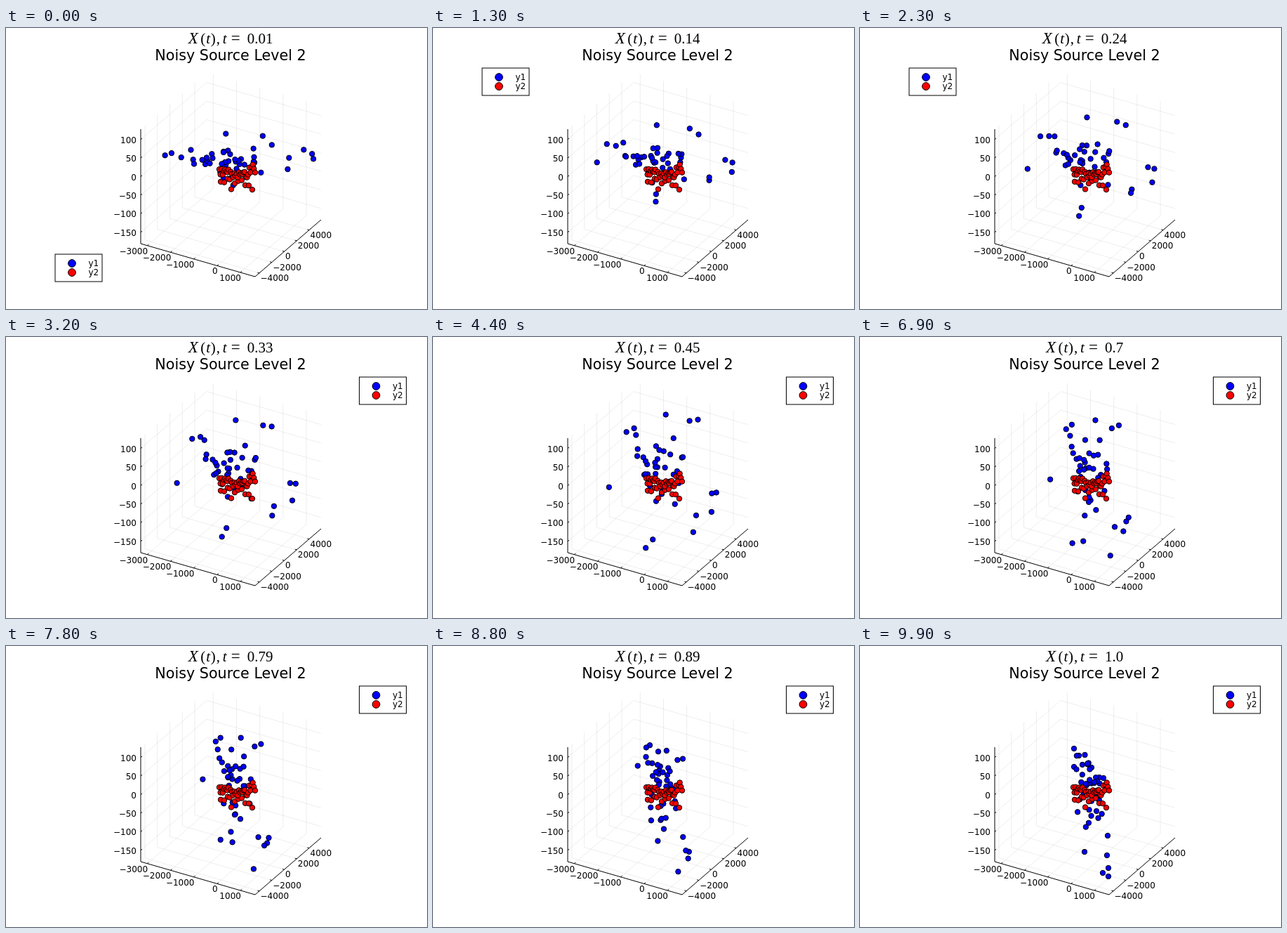
Write an HTML page with a canvas that moves like this. It is 600 px wide and 400 px high and loops after 10 s.

```html
<!DOCTYPE html>
<html lang="en">
<head>
<meta charset="utf-8">
<title>Noisy Source Level 2</title>
<style>
html, body { margin: 0; width: 100%; height: 100%; overflow: hidden; background: #fff; }
canvas { display: block; width: 600px; height: 400px; }
</style>
</head>
<body>
<canvas id="stage" width="600" height="400"></canvas>
<script>
const ctx = document.getElementById('stage').getContext('2d');
const BLUE = '#0000ff', RED = '#ff0000';
const SANS = '"DejaVu Sans", sans-serif', SERIF = '"Liberation Serif", serif';
const STEP = 100, STEPS = 100;

function seeded(seed) {
  return () => {
    seed = (seed * 1664525 + 1013904223) % 4294967296;
    return seed / 4294967296;
  };
}
const rand = seeded(7);
const spread = (size) => (rand() + rand() + rand() - 1.5) * 2 * size;

// Far-out dots: where they start, where they end, how far they swing on the way.
const path = (x0, y0, x1, y1, swing) => ({ x0, y0, x1, y1, swing });
const outer = [
  path(226, 181, 305, 146, 52),
  path(249, 185, 312, 156, -45),
  path(263, 174, 305, 172, -36),
  path(313, 151, 330, 173, -54),
  path(324, 223, 318, 212, 88),
  path(320, 213, 337, 235, 70),
  path(310, 214, 320, 293, -17),
  path(379, 167, 347, 188, -63),
  path(366, 154, 341, 187, -53),
  path(402, 200, 353, 270, 24),
  path(404, 183, 346, 323, 34),
  path(425, 172, 354, 328, -21),
  path(437, 178, 354, 316, -20),
  path(439, 185, 352, 298, 14),
];

// The core closes in sideways and tilts: left dots end higher than right ones.
function corePath() {
  const side = spread(34);
  return path(322 + side, 188 + spread(9),
    329 + 0.28 * side + spread(6), 203 + 0.4 * side + spread(24),
    spread(24) - 12);
}
const cloud = [...outer, ...Array.from({ length: 32 }, corePath)];

// A sagging band with a sparser, slanted row below it.
const range = (n) => Array.from({ length: n }, (_, i) => i / (n - 1));
const target = [
  ...range(10).map((u) => [306 + 45 * u, 216 + 14 * u + spread(5)]),
  ...range(32).map((u) => [304 + 51 * u, 201 + 8 * Math.sin(Math.PI * u) + spread(4)]),
];

function line(x1, y1, x2, y2) {
  ctx.beginPath();
  ctx.moveTo(x1, y1);
  ctx.lineTo(x2, y2);
  ctx.stroke();
}

function dot(x, y, r, color) {
  ctx.beginPath();
  ctx.arc(x, y, r, 0, 2 * Math.PI);
  ctx.fillStyle = color;
  ctx.fill();
  ctx.strokeStyle = '#000';
  ctx.lineWidth = 1;
  ctx.stroke();
}

function text(str, x, y, font, align = 'left') {
  ctx.font = font;
  ctx.textAlign = align;
  ctx.fillStyle = '#000';
  ctx.fillText(str, x, y);
}

const label = (n) => String(n).replace('-', '\u2212');

function each(count, fn) {
  for (let i = 0; i < count; i++) fn(i);
}

function drawAxes() {
  const small = '12px ' + SANS;
  const xAt = (i) => [201.3 + 33.2 * i, 309.7 + 9.57 * i];
  const yAt = (i) => [361 + 17.75 * i, 348.8 - 15.3 * i];
  const zAt = (i) => 158.6 + 26.45 * i;

  ctx.lineWidth = 1;
  ctx.strokeStyle = 'rgba(0,0,0,0.07)';
  each(5, (i) => {
    const [x, y] = xAt(i);
    line(x, y, x + 94, y - 81);
    line(x + 94, y - 81, x + 94, y - 244);
  });
  each(5, (i) => {
    const [x, y] = yAt(i);
    line(x, y, x - 163, y - 47);
    line(x - 163, y - 47, x - 163, y - 210);
  });
  each(6, (i) => {
    const y = zAt(i);
    line(192, y, 286, y - 81);
    line(286, y - 81, 449, y - 34);
  });

  ctx.strokeStyle = '#000';
  line(192, 144, 192, 307);
  line(192, 307, 355, 354);
  line(355, 354, 449, 273);
  each(5, (i) => {
    const [x, y] = xAt(i);
    line(x, y, x + 2, y - 1.7);
    text(label(1000 * (i - 3)), x + 0.8, y + 12, small, 'right');
  });
  each(5, (i) => {
    const [x, y] = yAt(i);
    line(x, y, x - 2.5, y - 0.7);
    text(label(2000 * (i - 2)), x + 1.5, y + 11, small);
  });
  each(6, (i) => {
    const y = zAt(i);
    line(192, y, 194, y - 1.7);
    text(label(100 - 50 * i), 186, y + 5, small, 'right');
  });
}

function drawTitle(t) {
  const value = t === 1 ? '1.0' : String(t);
  const left = 320 - (value.length * 10.5 + 80.5) / 2;
  const roman = '21px ' + SERIF, italic = 'italic 21px ' + SERIF;
  const y = 21.5;
  text('X', left + 1, y, 'italic 23px ' + SERIF);
  text('(', left + 18.5, y, roman);
  text('t', left + 26.5, y, italic);
  text(')', left + 33, y, roman);
  text(',', left + 41, y, roman);
  text('t', left + 50, y, italic);
  text('=', left + 62, y, '23px ' + SERIF);
  text(value, left + 85, y, roman);
  text('Noisy Source Level 2', 320, 46, '20.7px ' + SANS, 'center');
}

function drawLegend(step) {
  const x = step < 28 ? 70 : 503.5;
  const y = step < 6 ? 322 : 57;
  ctx.fillStyle = '#fff';
  ctx.fillRect(x, y, 67, 39);
  ctx.strokeStyle = '#000';
  ctx.lineWidth = 1;
  ctx.strokeRect(x, y, 67, 39);
  [['y1', BLUE], ['y2', RED]].forEach(([name, color], i) => {
    dot(x + 24, y + 13 + 13 * i, 5.4, color);
    text(name, x + 47.5, y + 17 + 13 * i, '12px ' + SANS);
  });
}

// Straight drift plus a leaning swing that peaks a little after halfway.
function drawDots(t) {
  const swing = Math.sin(Math.PI * Math.pow(t, 1.2));
  for (const p of cloud) {
    const s = p.swing * swing;
    dot(p.x0 + (p.x1 - p.x0) * t - 0.22 * s, p.y0 + (p.y1 - p.y0) * t + s, 3.7, BLUE);
  }
  for (const [x, y] of target) dot(x, y, 3.7, RED);
}

function draw(step) {
  const t = (step + 1) / STEPS;
  ctx.fillStyle = '#fff';
  ctx.fillRect(0, 0, 600, 400);
  drawAxes();
  drawDots(t);
  drawTitle(t);
  drawLegend(step);
}

const origin = performance.now();
function tick() {
  const elapsed = Math.max(0, performance.now() - origin);
  draw(Math.floor(elapsed / STEP) % STEPS);
  requestAnimationFrame(tick);
}
tick();
</script>
</body>
</html>
```
